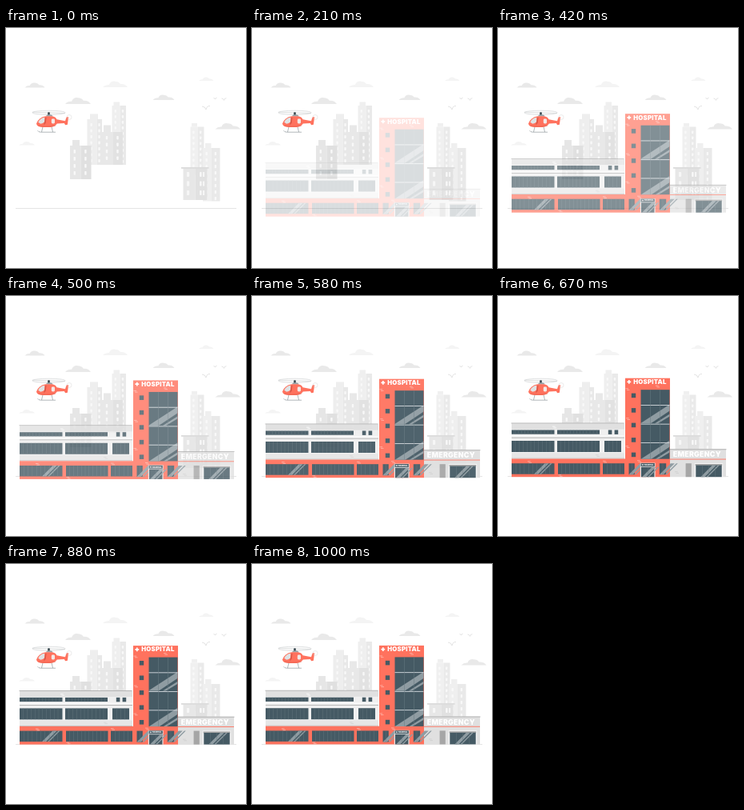
An HTML page for the animation above (1.04 s loop, 300 by 300 pixels).

```html
<!DOCTYPE html>
<html lang="en">
<head>
<meta charset="utf-8">
<title>Hospital</title>
<style>
html, body { margin: 0; width: 100%; height: 100%; overflow: hidden; background: #fff; }
svg { display: block; width: 100vw; height: 100vh; }
text { font-family: Inter, "Open Sans", sans-serif; font-weight: 900; fill: #fff; }
</style>
</head>
<body>
<svg id="stage" viewBox="0 0 300 300" xmlns="http://www.w3.org/2000/svg">
  <g id="sky"></g>
  <g id="city"></g>
  <path d="M12 225.6H288" stroke="#cfcfcf" stroke-width=".6"/>
  <g id="heli"></g>
  <g id="hospital" opacity="0"></g>
</svg>
<script>
const RED = '#ff725e', GLASS = '#455a64', SHINE = '#8f9ca2', WALL = '#f0f0f0', GREY = '#e0e0e0', EDGE = '#a6a6a6';
const $ = id => document.getElementById(id);
const rect = (x, y, w, h, fill, more = '') =>
  `<rect x="${x}" y="${y}" width="${w}" height="${h}" fill="${fill}" ${more}/>`;
const path = (d, fill, more = '') => `<path d="${d}" fill="${fill}" ${more}/>`;
const line = (d, color, width) => path(d, 'none', `stroke="${color}" stroke-width="${width}"`);
const label = (x, y, size, gap, str) =>
  `<text x="${x}" y="${y}" font-size="${size}" letter-spacing="${gap}">${str}</text>`;
const cross = (x, y, r, t) =>
  line(`M${x - r} ${y}h${2 * r}M${x} ${y - r}v${2 * r}`, '#fff', t);

// Sky
const cloud = (x, y, w, h, fill) => path(
  `M${x} ${y + h}q${w * .1} ${-h * .45} ${w * .25} ${-h * .4}` +
  `q${w * .06} ${-h * .65} ${w * .24} ${-h * .58}q${w * .16} 0 ${w * .22} ${h * .45}` +
  `q${w * .2} ${-h * .05} ${w * .29} ${h * .53}z`, fill);
const bird = (x, y, s) =>
  line(`M${x - s} ${y - s * .5}q${s * .8} 0 ${s} ${s * .8}q${s * .2} ${-s} ${s} ${-s * .9}`, '#d2d2d2', .6);
$('sky').innerHTML = [
  [23.5, 68.5, 25, 6, '#e9e9e9'], [74, 87, 32, 8, '#e9e9e9'], [121, 66.5, 31, 7.5, '#f4f4f4'],
  [183.5, 83.5, 27, 6.5, '#e9e9e9'], [261.5, 119, 31.5, 7.5, '#e9e9e9'],
  [241, 61.5, 18.5, 4.5, '#f4f4f4'], [16, 142, 20, 4.5, '#f4f4f4']
].map(c => cloud(...c)).join('') +
  bird(250, 100.5, 5) + bird(261.5, 88.5, 2) + bird(272.5, 89.5, 3);

// City blocks: front face, side face, rooftop box and window columns
function block(x, y, w, h, split, front, side, capX, capW, capH, step) {
  let s = rect(x, y, split, h, front) + rect(x + split, y, w - split, h, side) +
    rect(capX, y - capH, capW, capH, front);
  for (let wy = y + 5; wy < y + h - 5; wy += step)
    for (const wx of [x + split * .42, x + split + (w - split) * .45])
      s += rect(wx - 1.1, wy, 2.4, step * .52, '#f8f8f8', 'rx=".8"');
  return s;
}
$('city').innerHTML =
  block(132.5, 97, 17.5, 74, 10, '#efefef', '#e9e9e9', 134.5, 7.5, 4.5, 7) +
  block(101.5, 114, 18.5, 57, 12, '#eeeeee', '#e8e8e8', 105, 10, 6.5, 7.5) +
  block(120, 130, 26, 41, 14, '#e8e8e8', '#e2e2e2', 122, 9, 8.5, 8.5) +
  block(80, 147, 26.5, 42, 13.5, '#e6e6e6', '#e0e0e0', 83, 9, 7, 9) +
  block(230.5, 123.5, 17, 60, 9, '#f0f0f0', '#eaeaea', 232, 7, 4.5, 7) +
  block(246, 150, 21.5, 66.5, 11, '#efefef', '#e9e9e9', 249, 7.5, 6, 8) +
  block(221.5, 175, 30, 40, 15, '#e7e7e7', '#e1e1e1', 221.5, 1, 0, 11.5) +
  rect(219, 174, 34.5, 1.8, '#dcdcdc') +
  [226, 246].map(x => [180, 191.5, 203].map(y => rect(x, y, 2.2, 6, '#f5f5f5')).join('')).join('');

// Helicopter
$('heli').innerHTML =
  '<ellipse cx="53.5" cy="105.8" rx="20.5" ry="2.6" fill="#fbfbfb" stroke="#b0b5b8" stroke-width=".4"/>' +
  line('M33 105.2L74 106.6', '#b5babc', .4) +
  line('M46 123.5l-1.5 6.5M57 123.5l1.5 6.5M39.5 128.2q1 2 4 2h18.5', '#7d878c', .6) +
  path('M50 110.6q.5-2.2 2-2.4h4q2 .4 2.6 2.4z', '#9aa3a7') +
  path('M38 119.5q3-8 11.5-9.2h8q4.5.6 6 4l10.5 2 1.5-4.8 2.6-.3-1.2 9.6-2.8.4-1.3-2.2-9 .6q-2.5 3.8-8 4.4h-10q-7.5-.3-7.8-4.5z', RED) +
  path('M40.2 117.8q3-5.4 8-6v5.4q-2 2.4-5 2.6z', '#dfe3e5') +
  path('M49.3 111.8h1.2l-.8 7-2.6 3z', '#d95848') +
  rect(56.8, 113.6, 4.2, 5.8, '#f3e9e7', 'rx="1.4"') +
  line('M41 122.4q8 1.4 21-.2', '#d95848', .5) +
  '<circle cx="79" cy="111.5" r="3" fill="none" stroke="#cfcfcf" stroke-width=".4"/>' +
  rect(52.2, 105.2, 2.6, 3.4, '#37474f', 'rx=".8"');

// Glazing with evenly spaced mullions and an optional slanted shine
function pane(x, y, w, h, step = 0, shine = -1) {
  let s = rect(x, y, w, h, GLASS);
  if (shine >= 0) {
    const a = x + shine;
    s += path(`M${a} ${y + h}l${h} ${-h}h5l${-h} ${h}zM${a + 7} ${y + h}l${h} ${-h}h2l${-h} ${h}z`, SHINE);
  }
  for (let m = x + step; step && m < x + w - 1; m += step)
    s += rect(m - .2, y, .4, h, '#66787f');
  return s;
}
const brick = (x, y, color) => rect(x, y, 3.6, 1, color) + rect(x + 1.4, y + 1.7, 3.6, 1, color);

const leftWing =
  rect(17, 158.6, 141, 45, WALL) + rect(17, 159.4, 141, 7, GREY) +
  rect(16.5, 158.4, 141, .8, EDGE) +
  pane(17, 167.3, 53.5, 5.2, 4.1) + pane(74, 167.3, 53, 5.2, 4.1) +
  pane(137.8, 167.3, 4.6, 5.4) + pane(145.6, 167.3, 4.6, 5.4) +
  rect(17, 173.8, 141, 2.4, '#f8f8f8') + rect(17, 176.5, 141, .8, EDGE) +
  pane(17, 180.8, 53.5, 14, 4.8) + pane(74, 180.8, 53, 14, 4.8) + pane(133, 180.8, 21, 14, 5.2) +
  rect(17, 196, 141, 6.5, '#e6e6e6') + rect(17, 202.4, 141, .8, '#b9b9b9') +
  rect(17, 203.3, 142, 22.7, RED) +
  pane(17, 209, 53.5, 13.5, 5.3, 28) + pane(75, 209, 52.5, 13.5, 4.8) +
  pane(131, 209, 27, 13.5, 5.4) +
  brick(37, 206, '#ffa99c') + brick(131, 205.6, '#ffa99c') + brick(75.5, 223, '#ffa99c') +
  brick(68, 162.5, '#f7f7f7') + brick(122, 198, '#d8d8d8');

function tower() {
  let s = rect(159, 102.5, 56, 123.5, RED);
  for (let i = 0; i < 5; i++) s += rect(166.8, 121.4 + i * 18.5, 5.4, 5.6, GLASS);
  s += pane(178.5, 117, 36, 86.5) +
    '<clipPath id="glass"><rect x="178.5" y="117" width="36" height="86.5"/></clipPath><g clip-path="url(#glass)">';
  for (const y of [159, 204])
    s += path(`M178 ${y}L215 ${y - 24}v8L191 ${y}zM196 ${y}L215 ${y - 12}v3L200 ${y}z`, SHINE);
  s += '</g>';
  for (const y of [135.8, 159.5, 182.8]) s += rect(178.5, y, 36, .9, '#d4dade');
  for (const x of [190.3, 202.4]) s += rect(x, 117, .5, 86.5, '#687a83');
  return s +
    brick(159.5, 115, '#ffa99c') + brick(197, 111.5, '#ffa99c') + brick(160, 152, '#ffa99c') +
    brick(159.5, 187, '#ffa99c') + brick(174, 205, '#ffa99c') +
    pane(163.5, 209, 7.3, 14, 3.7, 0) + pane(201.8, 209, 8.4, 14, 4.2, 0) +
    rect(177.8, 208.4, 18.8, 17.6, '#e6e6e6') + rect(178.6, 208.8, 17.2, 4, GLASS) +
    cross(180.8, 210.8, 1, .7) + label(182.8, 211.7, 2.3, 0, 'HOSPITAL') +
    pane(179, 213.6, 16.4, 12.4, 8.2, 1) +
    cross(163.8, 107.2, 2.4, 1.7) + label(169.3, 109.9, 7.8, .2, 'HOSPITAL');
}

const rightWing =
  rect(215, 191.2, 70, 34.8, GREY) + rect(214.5, 191.2, 71, .8, EDGE) +
  rect(215, 203.4, 70, .9, RED) +
  rect(234.6, 209, 7.2, 17, EDGE) +
  rect(245.6, 208.8, 35.6, 17.2, '#f5f5f5') + rect(246.6, 209.8, 33.6, 2, EDGE) +
  pane(247.3, 211.4, 32.4, 14.6, 8.1, 6) +
  brick(221, 219, '#d2d2d2') +
  label(218.8, 201.2, 8.9, .25, 'EMERGENCY');

const hospital = $('hospital');
hospital.innerHTML = `<g transform="translate(0 -.6)">${leftWing}${rightWing}${tower()}</g>`;

// Motion: time in ms, opacity, drop in px
const LOOP = 1040, FPS = 24;
const KEYS = [
  [83, 0, 12], [130, .04, 11.6], [210, .2, 10.3], [330, .46, 7.6], [420, .67, 5.3],
  [580, .94, 1.8], [670, 1, .8], [750, 1, .4], [1000, 1, 0], [LOOP, 1, 0]
];
const stepTime = k => Math.round(k * 100 / FPS) * 10;

function pose(t) {
  if (t < 130) return [0, 12];
  const i = KEYS.findIndex(k => k[0] >= t);
  const a = KEYS[i - 1], b = KEYS[i], f = (t - a[0]) / (b[0] - a[0]);
  return [1, 2].map(n => a[n] + (b[n] - a[n]) * f);
}
function draw(now) {
  const t = now % LOOP;
  let k = Math.floor(t * FPS / 1000) + 1;
  while (stepTime(k) > t) k--;
  const [alpha, drop] = pose(stepTime(k));
  hospital.setAttribute('opacity', alpha.toFixed(3));
  hospital.setAttribute('transform', `translate(0 ${drop.toFixed(2)})`);
}
const start = performance.now();
function tick() {
  draw(performance.now() - start);
  requestAnimationFrame(tick);
}
tick();
</script>
</body>
</html>
```
